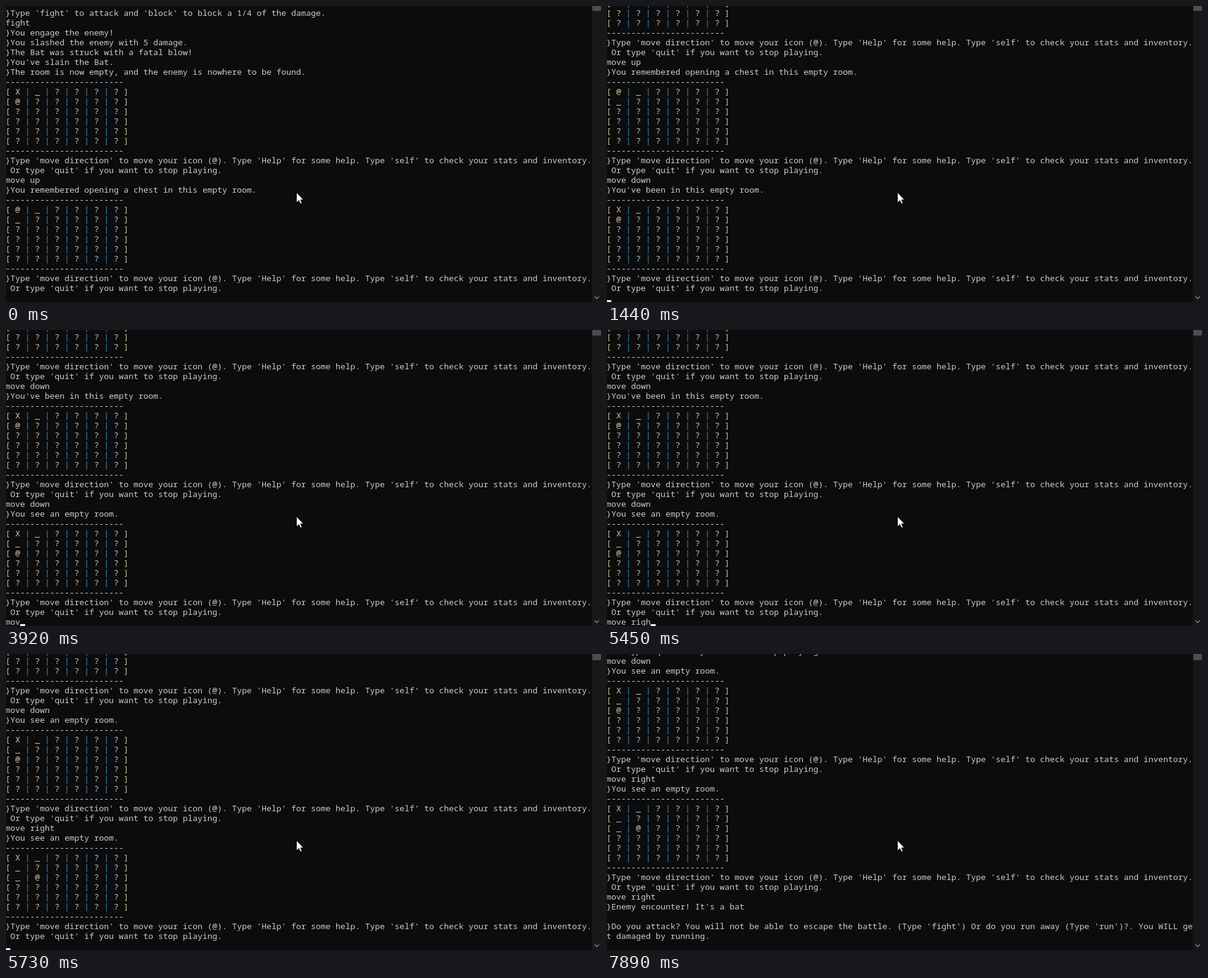
These frames come from a looping animation (966x482 px, 8000 ms). An HTML page with a canvas:

```html
<!DOCTYPE html>
<html lang="en">
<head>
<meta charset="utf-8">
<title>Dungeon console</title>
<style>
  html, body { margin: 0; height: 100%; overflow: hidden; background: #0c0c0c; }
  canvas { display: block; }
</style>
</head>
<body>
<canvas id="stage" width="966" height="482"></canvas>
<script>
const ctx = document.getElementById('stage').getContext('2d');
const LOOP = 8000, CELL = 8, LINE = 16, ROWS = 29;
const TINTS = { '|': '#3f92d2', '[': '#d9c2a0', ']': '#d9c2a0', '@': '#dccdb4' };

const rule = '-'.repeat(24);
const prompt = [
  "}Type 'move direction' to move your icon (@). Type 'Help' for some help. Type 'self' to check your stats and inventory.",
  " Or type 'quit' if you want to stop playing."
];

// Known cells of each map row; everything else is unexplored.
function map(...known) {
  const rows = Array.from({ length: 6 }, (_, i) =>
    `[ ${[...(known[i] || '').padEnd(6, '?')].join(' | ')} ]`);
  return [rule, ...rows, rule];
}
const turn = (command, message, ...known) => [command, message, ...map(...known), ...prompt];

// Console output, one block per command.
const blocks = [
  [
    "}Type 'fight' to attack and 'block' to block a 1/4 of the damage.",
    'fight',
    '}You engage the enemy!',
    '}You slashed the enemy with 5 damage.',
    '}The Bat was struck with a fatal blow!',
    "}You've slain the Bat.",
    '}The room is now empty, and the enemy is nowhere to be found.',
    ...map('X_', '@'), ...prompt,
    ...turn('move up', '}You remembered opening a chest in this empty room.', '@_', '_')
  ],
  turn('move down', "}You've been in this empty room.", 'X_', '@'),
  turn('move down', '}You see an empty room.', 'X_', '_', '@'),
  turn('move right', '}You see an empty room.', 'X_', '_', '_@'),
  [
    'move right',
    "}Enemy encounter! It's a bat",
    '',
    "}Do you attack? You will not be able to escape the battle. (Type 'fight') Or do you run away (Type 'run')?. You WILL ge",
    't damaged by running.'
  ]
];
const thumbHeights = [8, 8, 9, 10, 10];

// [time, blocks printed after the first, typed input, cursor hidden]
const steps = [
  [0, 0, '', true],
  [150, 0, 'm'], [290, 0, 'mo'], [440, 0, 'move'], [580, 0, 'move '],
  [1010, 0, 'move do'], [1160, 0, 'move down'],
  [1440, 1, ''], [2160, 1, '', true],
  [2460, 1, 'mo'], [2600, 1, 'move '], [2740, 1, 'move d'],
  [2890, 1, 'move dow'], [3030, 1, 'move down'],
  [3170, 2, ''],
  [3760, 2, 'm'], [3910, 2, 'mov'], [4070, 2, 'move'], [4220, 2, 'move '],
  [4680, 2, 'move ', true],
  [5140, 2, 'move r'], [5290, 2, 'move ri'], [5450, 2, 'move righ'], [5600, 2, 'move right'],
  [5730, 3, ''],
  [6310, 3, 'm'], [6450, 3, 'mo'], [6600, 3, 'move'], [6740, 3, 'move '],
  [6880, 3, 'move r'], [7030, 3, 'move rig'], [7170, 3, 'move right'],
  [7320, 4, ''], [7890, 4, '', true]
];

function rect(color, x, y, w, h) {
  ctx.fillStyle = color;
  ctx.fillRect(x, y, w, h);
}

function drawLine(text, row) {
  [...text].forEach((char, col) => {
    if (char === ' ') return;
    ctx.fillStyle = TINTS[char] || '#cccccc';
    ctx.fillText(char, col * CELL - 1, row * LINE + 16);
  });
}

function drawScrollbar(thumb) {
  rect('#171717', 951, 0, 15, 482);
  rect('#4d4d4d', 952, 0, 14, thumb);
  ctx.strokeStyle = '#858585';
  ctx.lineWidth = 1.5;
  ctx.stroke(new Path2D('M955.5 473 L959 476.5 L962.5 473'));
}

const pointer = new Path2D('M471.5 303.5 V320.5 L475.5 316.8 L478 322.3 L480.7 321.2 L478.3 315.8 H483.3 Z');
function drawPointer() {
  ctx.fillStyle = '#fff';
  ctx.fill(pointer);
  ctx.strokeStyle = '#000';
  ctx.lineWidth = 1;
  ctx.stroke(pointer);
}

function draw(time) {
  const [, printed, input, hidden] = steps.findLast(step => step[0] <= time);
  const log = blocks.slice(0, printed + 1).flat();
  const first = log.length - ROWS;

  rect('#0c0c0c', 0, 0, 966, 482);
  ctx.font = '13.333px "Noto Sans Mono", "DejaVu Sans Mono", monospace';
  for (let row = -1; row < ROWS; row++) drawLine(log[first + row] || '', row);
  drawLine(input, ROWS);
  if (!hidden) rect('#fff', input.length * CELL - 1, 479, CELL, 4);

  drawScrollbar(thumbHeights[printed]);
  drawPointer();
}

function tick() {
  draw(performance.now() % LOOP);
  requestAnimationFrame(tick);
}
tick();
</script>
</body>
</html>
```
